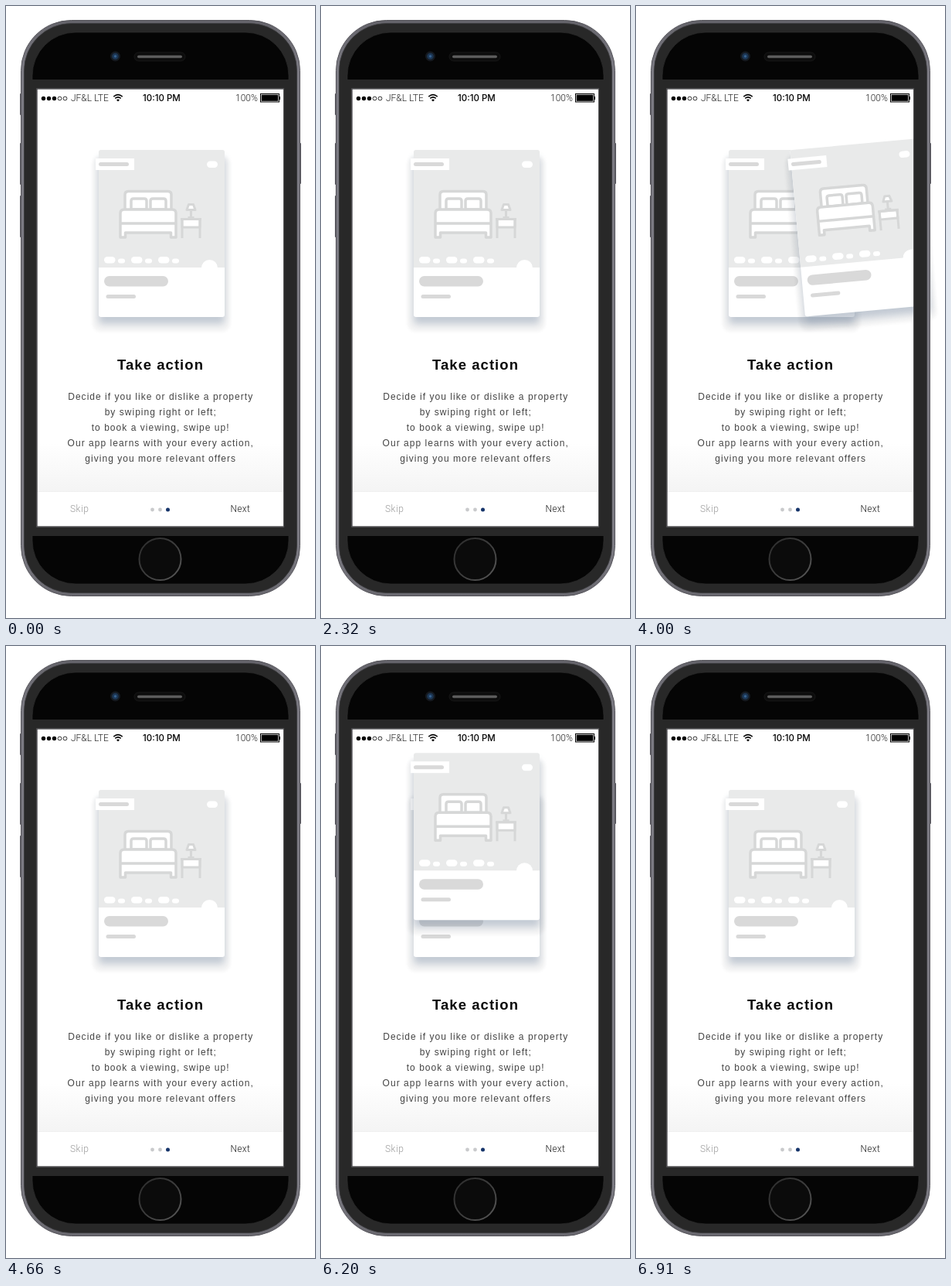
These frames come from a looping animation (400x791 px, 7140 ms). An HTML page:

```html
<!DOCTYPE html>
<html lang="en">
<head>
<meta charset="utf-8">
<title>Swipe cards</title>
<style>
  html, body { margin: 0; width: 100%; height: 100%; overflow: hidden; background: #fff; }
  svg { display: block; width: 100%; height: 100%; }
  .sans { font-family: "Liberation Sans", Arial, sans-serif; }
  .thin { font-family: Roboto, sans-serif; font-weight: 300; font-size: 12px; }
</style>
</head>
<body>
<svg viewBox="0 0 400 791" xmlns="http://www.w3.org/2000/svg">
  <defs>
    <linearGradient id="fade" x2="0" y2="1">
      <stop stop-color="#fff"/><stop offset="1" stop-color="#f4f4f4"/>
    </linearGradient>
    <linearGradient id="rim" x2="0" y2="1">
      <stop stop-color="#64636a"/><stop offset=".08" stop-color="#7b7a82"/>
      <stop offset=".92" stop-color="#7b7a82"/><stop offset="1" stop-color="#69686f"/>
    </linearGradient>
    <linearGradient id="ring" x2="1" y2="1">
      <stop stop-color="#2c2c2c"/><stop offset=".5" stop-color="#3c3c3c"/><stop offset="1" stop-color="#5a5a5a"/>
    </linearGradient>
    <filter id="blur" x="-20%" y="-20%" width="140%" height="140%"><feGaussianBlur stdDeviation="5"/></filter>
    <filter id="soft" x="-20%" y="-20%" width="140%" height="140%"><feGaussianBlur stdDeviation="2"/></filter>
    <clipPath id="area"><rect x="30" width="370" height="791"/></clipPath>

    <g id="shadow">
      <rect x="112" y="194" width="178" height="227" rx="10" opacity=".04" filter="url(#soft)"/>
      <rect x="120" y="196" width="163" height="215" rx="4" fill="#8d9cb0" opacity=".48" filter="url(#blur)"/>
    </g>

    <g id="card">
      <rect x="120" y="186" width="163" height="216" rx="3" fill="#fff"/>
      <path d="M120 338V189q0-3 3-3H280q3 0 3 3V338Z" fill="#e9eaea"/>
      <g fill="#fff">
        <rect x="116" y="197" width="50" height="15"/>
        <rect x="260" y="200.500" width="14" height="8.500" rx="4.200"/>
        <g id="tags">
          <rect x="127" y="324" width="14.500" height="8.500" rx="4.200"/>
          <rect x="145" y="326.500" width="9" height="6" rx="3"/>
        </g>
        <use href="#tags" x="35"/>
        <use href="#tags" x="70"/>
        <circle cx="263.500" cy="338.500" r="10.500"/>
      </g>
      <g fill="#d9d9d9">
        <rect x="120" y="202" width="39" height="5" rx="2.500"/>
        <rect x="127" y="349" width="83" height="13.500" rx="6.700"/>
        <rect x="129.500" y="373" width="38.500" height="5" rx="2.500"/>
      </g>
      <g fill="#fff" stroke="#d6d7d7" stroke-width="3.500" stroke-linejoin="round">
        <path d="M154 264V244q0-4.500 4.500-4.500H209.500q4.500 0 4.500 4.500V264Z"/>
        <path id="pillow" d="M162 263V252q0-3 3-3H179q3 0 3 3V263Z"/>
        <use href="#pillow" x="25"/>
        <path d="M148 299V268q0-5 5-5H215q5 0 5 5V299H213.500V293H154.500V299ZM148 281H220"/>
        <g stroke-width="3">
          <path d="M228 275.500H251V286H228Z"/>
          <path d="M228 300V275.500H251V300M226 275.500H253" fill="none"/>
          <path d="M239.500 264V274M235.500 273.500H243.500" fill="none"/>
          <path d="M236.500 256.500H242.500L245 263.500H234Z"/>
        </g>
      </g>
    </g>
  </defs>

  <rect width="400" height="791" fill="#fff"/>
  <rect x="40" y="565" width="320" height="63" fill="url(#fade)"/>
  <path d="M40 627.500H360" stroke="#efefef"/>

  <text class="sans" x="200" y="469.500" text-anchor="middle" font-size="18.500" font-weight="700" letter-spacing="1.050" fill="#0a0a0a">Take action</text>
  <g class="sans" font-size="12" letter-spacing="1.030" text-anchor="middle" fill="#444">
    <text x="200.200" y="509">Decide if you like or dislike a property</text>
    <text x="200.200" y="529">by swiping right or left;</text>
    <text x="200.200" y="549">to book a viewing, swipe up!</text>
    <text x="200.200" y="569">Our app learns with your every action,</text>
    <text x="200.200" y="589">giving you more relevant offers</text>
  </g>
  <g class="thin">
    <text x="83" y="654" letter-spacing=".5" fill="#999">Skip</text>
    <text x="290.500" y="654" letter-spacing=".3" fill="#222">Next</text>
  </g>
  <g fill="#c9cacc">
    <circle cx="189.500" cy="651" r="2.400"/>
    <circle cx="199.500" cy="651" r="2.400"/>
    <circle cx="209.500" cy="651" r="2.500" fill="#17356b"/>
  </g>

  <use href="#shadow"/>
  <use href="#card"/>
  <g clip-path="url(#area)">
    <g id="top">
      <use id="glow" href="#shadow"/>
      <use href="#card"/>
    </g>
  </g>

  <!-- phone shell with an open screen -->
  <g fill="#5c5b62">
    <rect x="18" y="113" width="3" height="28" rx="1"/>
    <rect x="18" y="177" width="3" height="54" rx="1"/>
    <rect x="18" y="245" width="3" height="54" rx="1"/>
    <rect x="379" y="177" width="3" height="53" rx="1"/>
  </g>
  <g fill-rule="evenodd">
    <path id="rimShape" fill="url(#rim)" stroke="#56555b"/>
    <path id="bodyShape" fill="#282828" stroke="#3a3a3d" stroke-width=".8"/>
  </g>
  <rect x="39.700" y="106.700" width="320" height="566.600" fill="none" stroke="#5a5a5c" stroke-width=".8"/>
  <g fill="#050505" stroke="#303030" stroke-width=".7">
    <path d="M34 95.500V90A56 56 0 0 1 90 34H310A56 56 0 0 1 366 90V95.500Z"/>
    <path d="M34 684.500V691A56 56 0 0 0 90 747H310A56 56 0 0 0 366 691V684.500Z"/>
  </g>
  <circle cx="141.500" cy="65" r="6.500" fill="#15191f"/>
  <circle cx="141.500" cy="65" r="4.300" fill="#1c3552"/>
  <circle cx="141.500" cy="65" r="1.800" fill="#35618f"/>
  <rect x="166" y="60" width="66" height="11" rx="5.500" fill="#0c0c0c" stroke="#181818"/>
  <rect x="170" y="63.800" width="58" height="3.400" rx="1.700" fill="#5c5c5c"/>
  <circle cx="199.500" cy="715" r="27" fill="#0b0b0b" stroke="url(#ring)" stroke-width="2"/>

  <!-- status bar -->
  <g fill="#000">
    <circle cx="48.500" cy="119.500" r="2.700"/>
    <circle cx="55.500" cy="119.500" r="2.700"/>
    <circle cx="62.500" cy="119.500" r="2.700"/>
    <g fill="none" stroke="#000" stroke-width=".8">
      <circle cx="69.500" cy="119.500" r="2.400"/>
      <circle cx="76.500" cy="119.500" r="2.400"/>
    </g>
    <g class="thin" fill="#222">
      <text x="84" y="123">JF&amp;L LTE</text>
      <text x="297" y="122.500">100%</text>
    </g>
    <text x="177" y="123" font-family="Inter, sans-serif" font-size="11.500" font-weight="500">10:10 PM</text>
    <path d="M145 123.500L143 121.300Q145 119.600 147 121.300Z"/>
    <path d="M141.300 119.400Q145 116.300 148.700 119.400M139.300 117.100Q145 112.300 150.700 117.100" fill="none" stroke="#000" stroke-width="1.600"/>
    <rect x="329.500" y="113.500" width="24" height="10.500" fill="#fff" stroke="#000"/>
    <rect x="330.700" y="114.700" width="21.600" height="8.100"/>
    <rect x="353.500" y="117" width="1.500" height="4"/>
  </g>
</svg>
<script>
  const LOOP = 7140, SWIPE = 940;
  // from: first visible change; start: beginning of the easing curve
  const swipes = [
    { from: 1360, start: 1210, dx: -308, dy: -28, turn: 17.5 },
    { from: 3650, start: 3650, dx: 306, dy: -26, turn: -18 },
    { from: 5980, start: 5980, dx: 0, dy: -420, turn: 0 }
  ];
  const $ = id => document.getElementById(id);
  const mover = $('top'), glow = $('glow');

  // rounded rectangle path with the screen cut out
  function shell(x, y, w, h, r) {
    const a = (dx, dy) => `a${r} ${r} 0 0 1 ${dx} ${dy}`;
    return `M${x + r} ${y}h${w - 2 * r}${a(r, r)}v${h - 2 * r}${a(-r, r)}` +
      `h${2 * r - w}${a(-r, -r)}v${2 * r - h}${a(r, -r)}ZM40 107H359.500V673H40Z`;
  }
  $('rimShape').setAttribute('d', shell(19.5, 18.5, 361, 744, 65));
  $('bodyShape').setAttribute('d', shell(23.5, 22.5, 353, 736, 61));

  // ease-in-out, cubic-bezier(.42, 0, .58, 1)
  function ease(t) {
    let lo = 0, hi = 1, s = t;
    for (let i = 0; i < 24; i++) {
      s = (lo + hi) / 2;
      const x = 1.26 * (1 - s) ** 2 * s + 1.74 * (1 - s) * s * s + s ** 3;
      if (x < t) lo = s; else hi = s;
    }
    return s * s * (3 - 2 * s);
  }

  function draw(ms) {
    const move = swipes.find(m => ms >= m.from && ms < m.start + SWIPE);
    mover.setAttribute('visibility', move ? 'visible' : 'hidden');
    if (!move) return;
    const t = (ms - move.start) / SWIPE, k = ease(t);
    mover.setAttribute('transform',
      `translate(${move.dx * k} ${move.dy * k}) rotate(${move.turn * k} 201.5 294)`);
    mover.setAttribute('opacity', Math.min(1, (1 - t) / 0.12));
    glow.setAttribute('opacity', Math.min(1, k * 15));
  }

  const begin = performance.now();
  function tick() {
    draw((performance.now() - begin) % LOOP);
    requestAnimationFrame(tick);
  }
  draw(0);
  requestAnimationFrame(tick);
</script>
</body>
</html>
```
